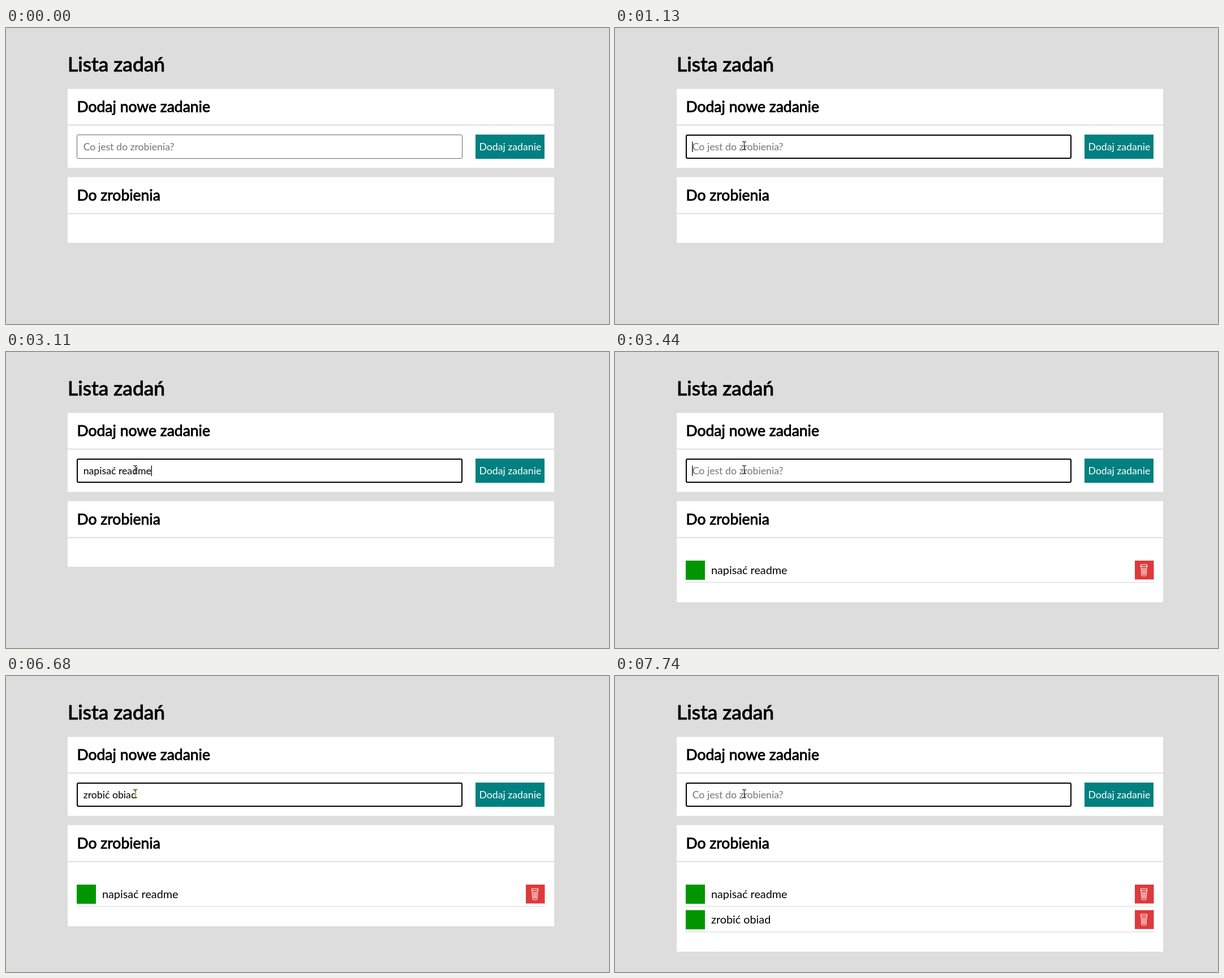
An HTML page for the animation above (8 s loop, 1066x525 px).

```html
<!DOCTYPE html>
<html lang="pl">
<head>
<meta charset="utf-8">
<title>Lista zadań</title>
<style>
  html, body { margin: 0; width: 100%; height: 100%; overflow: hidden; background: #ddd; }
  svg { display: block; width: 1066px; height: 525px; }
  text { font-family: Lato, sans-serif; white-space: pre; }
  .head { stroke: #000; stroke-width: .9; font-size: 26.5px; }
  .title { stroke-width: 1.1; font-size: 35.4px; }
  .field { font-size: 17.7px; }
  .item { font-size: 19.8px; }
</style>
</head>
<body>
<svg viewBox="0 0 1066 525">
  <defs>
    <g id="bin" fill="none" stroke="#fff" stroke-width="1.1">
      <path d="M10.3 10.2V8.8Q10.3 7 12.5 7H19.5Q21.7 7 21.7 8.8V10.2Z M11 10.5L12 25Q12.2 27 14 27H18Q19.800 27 20 25L21 10.5"/>
      <path d="M13.500 12.500L14.200 24.500M16 12.500V24.500M18.500 12.500L17.800 24.500"/>
    </g>
    <g id="row">
      <rect x="125" y="370" width="34" height="34" fill="#009600"/>
      <rect x="919" y="370" width="33.500" height="33.500" fill="#dc3a3b"/>
      <use href="#bin" x="919" y="370"/>
      <rect x="125" y="408" width="827" height="1.300" fill="#ddd"/>
    </g>
  </defs>
  <rect width="1066" height="525" fill="#ddd"/>
  <g fill="#fff">
    <rect x="109" y="108" width="860" height="63.300"/>
    <rect x="109" y="173.200" width="860" height="74.800"/>
    <rect x="109" y="264.500" width="860" height="63.700"/>
    <rect id="list" x="109" y="330.200" width="860"/>
  </g>
  <text class="head title" x="109" y="76.500">Lista zadań</text>
  <text class="head" x="125.500" y="148.500">Dodaj nowe zadanie</text>
  <text class="head" x="125.500" y="306">Do zrobienia</text>
  <rect id="box" fill="#fff" rx="2"/>
  <rect x="830" y="189" width="122" height="43" fill="teal"/>
  <text class="field" x="836.500" y="217" fill="#fff">Dodaj zadanie</text>
  <text class="field" id="hint" x="136.700" y="217" fill="#757575">Co jest do zrobienia?</text>
  <text class="field" id="typed" x="136.700" y="217"></text>
  <rect id="caret" y="201.500" width="1.300" height="18.500"/>
  <g id="row1"><use href="#row"/><text class="item" x="170" y="393.500">napisać readme</text></g>
  <g id="row2"><use href="#row" y="45.300"/><text class="item" x="170" y="438.700">zrobić obiad</text></g>
  <path id="arrow" d="M0 0V16L3.700 12.500L6.200 18.300L8.600 17.200L6.100 11.600H11.300Z" fill="#fff" stroke="#000"/>
  <g id="beam" fill="none" stroke="#222" stroke-width="1.200">
    <path d="M225 201.700H227.500L228.500 202.500L229.500 201.700H232M225 215.700H227.500L228.500 214.900L229.500 215.700H232M228.500 202.500V215"/>
    <path id="glow" d="M228.700 205V215" stroke="#e3d32b" stroke-width="1.500"/>
  </g>
</svg>
<script>
const LOOP = 8000, BLINK = 530;
const $ = id => document.getElementById(id);
const show = (id, on) => $(id).setAttribute('display', on ? 'inline' : 'none');
const set = (id, attrs) => {
  for (const k in attrs) $(id).setAttribute(k, attrs[k]);
};

// Each entry: text, moments of its key presses, moment it is submitted.
const entries = [
  { text: 'napisać readme', sent: 3440,
    keys: [1260, 1320, 1520, 1720, 1790, 1920, 2120, 2250, 2380, 2510, 2710, 2910, 3050, 3110] },
  { text: 'zrobić obiad ', sent: 6880,
    keys: [4170, 4370, 4480, 4590, 4700, 4970, 5100, 5280, 5390, 5500, 5610, 5810, 6140] }
];
const pointer = [[200, 240, 362], [290, 237, 310], [380, 232, 252]];
const focusAt = 470, caretAt = 610;

function draw(t) {
  const focus = t >= focusAt;
  const inset = focus ? 1 : .5;
  set('box', { x: 125 + inset, y: 189 + inset, width: 682 - 2 * inset, height: 43 - 2 * inset,
    stroke: focus ? '#000' : '#666', 'stroke-width': 2 * inset });

  let text = '', lastKey = caretAt;
  for (const e of entries) {
    const pressed = e.keys.filter(k => k <= t);
    if (pressed.length) lastKey = pressed[pressed.length - 1];
    if (t < e.sent) text += e.text.slice(0, pressed.length);
  }
  $('typed').textContent = text;
  show('hint', !text);

  const width = text ? $('typed').getComputedTextLength() : 0;
  set('caret', { x: 136.3 + width });
  show('caret', t >= caretAt && Math.floor((t - lastKey + 5) / BLINK) % 2 === 0);

  const count = entries.filter(e => t >= e.sent).length;
  set('list', { height: [50.8, 113.6, 158.8][count] });
  show('row1', count > 0);
  show('row2', count > 1);

  const step = pointer.filter(p => p[0] <= t).pop();
  show('arrow', step && !focus);
  if (step) set('arrow', { transform: `translate(${step[1]} ${step[2]})` });
  show('beam', focus);
  show('glow', t >= 6610 && t < 6880);
}

const start = performance.now();
function tick() {
  draw((performance.now() - start) % LOOP);
  requestAnimationFrame(tick);
}
tick();
</script>
</body>
</html>
```
